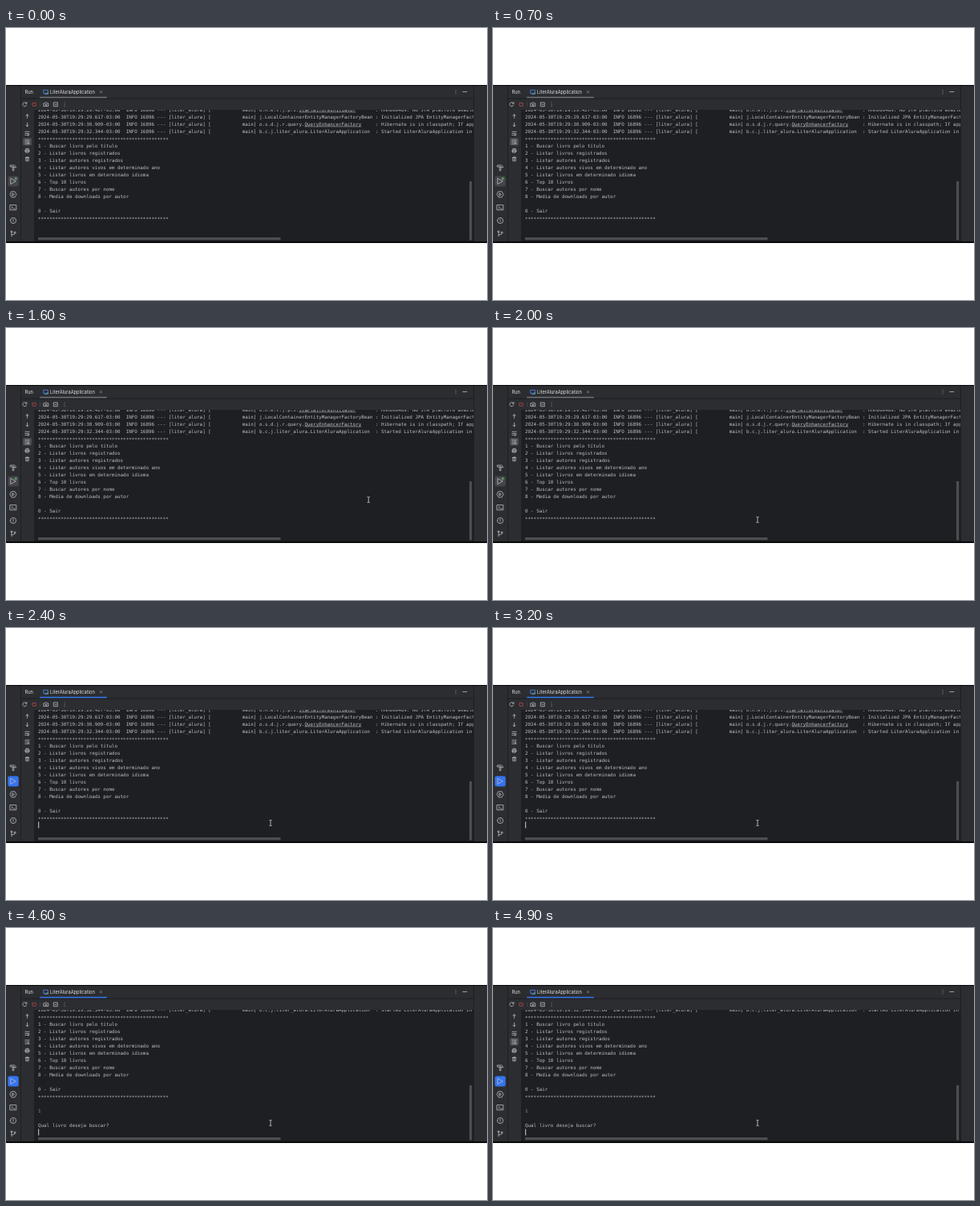
Write an HTML page that moves like this. It is 600 px wide and 339 px high and loops after 5000 ms.

```html
<!DOCTYPE html>
<html lang="pt">
<head>
<meta charset="utf-8">
<title>Console</title>
<style>
html, body { margin: 0; width: 100%; height: 100%; overflow: hidden; background: #fff; }
svg { display: block; width: 600px; height: 339px; }
text { white-space: pre; fill: #bcbec4; }
.ui { font: 5.7px Inter, sans-serif; fill: #dfe1e5; }
#log text { font: 5.88px "DejaVu Sans Mono", monospace; }
#log tspan { text-decoration: underline; }
#icons path { fill: none; stroke-width: .8; stroke-linecap: round; stroke-linejoin: round; }
</style>
</head>
<body>
<svg viewBox="0 0 600 339">
  <clipPath id="view"><rect x="36" y="102" width="547" height="163"/></clipPath>
  <rect y="71" width="600" height="197" fill="#2b2d30"/>
  <path d="M18.5 72V266M583.5 72V266M19 88H583" stroke="#1e1f22"/>
  <rect x="35" y="102" width="548" height="164" fill="#1e1f22"/>
  <path d="M0 71.5H600M0 266.5H600M0 267.5H600" stroke="#08090a"/>
  <text class="ui" x="23.5" y="81.7" font-weight="600">Run</text>
  <text class="ui" x="55" y="81.7">LiterAluraApplication</text>
  <rect id="tab" x="42" y="85.7" width="84" height="1.6" rx=".8"/>
  <rect id="run" x="2.3" y="184.5" width="13.4" height="13" rx="2.5"/>
  <rect id="follow" x="21" y="137" width="11" height="9.5" rx="2" fill="#4a4d52"/>
  <g id="icons"></g>
  <circle id="live" cx="12.2" cy="187.8" r="1.7" fill="#57965c"/>
  <g clip-path="url(#view)">
    <g id="log"></g>
    <rect id="caret" width="1" height="8" fill="#ced0d6"/>
  </g>
  <rect id="bar" x="578" width="3.2" fill="#4d4e51"/>
  <rect x="40" y="261" width="302.5" height="3.2" fill="#4d4e51"/>
  <path id="mouse" d="M-1.6-3.6Q0-3.6 0-2.6Q0-3.6 1.6-3.6M0-2.6V2.6M-1.6 3.6Q0 3.6 0 2.6Q0 3.6 1.6 3.6" fill="none" stroke="#d5d6d8" stroke-width=".8"/>
</svg>
<script>
const $ = id => document.getElementById(id);
const set = (id, attrs) => { for (const k in attrs) $(id).setAttribute(k, attrs[k]); };
const show = (id, on) => $(id).style.display = on ? '' : 'none';

// Toolbar icons: centre x, centre y, outline, colour
const dots = 'M0-2.2v.01M0 0v.01M0 2.2v.01';
const ring = 'M-3.6 0a3.6 3.6 0 1 0 7.2 0a3.6 3.6 0 1 0-7.2 0';
const icons = [
  [9, 174, 'M-3.4-3H1.5L3.5-1.2V-.2H1V-1H-3.4ZM-.8-1V3.8H.8V-1'],
  [8.7, 191, 'M-2.6-3.4L3.5 0L-2.6 3.4Z'],
  [9, 207.4, 'M-2-3.6H2L4 0L2 3.6H-2L-4 0ZM-.9-1.5L1.5 0L-.9 1.5Z'],
  [9, 223.7, 'M-3.8-3.1H3.8V3.1H-3.8ZM-2-1.2L-.6 0L-2 1.2M.4 1.4H2'],
  [9, 240, ring + 'M0-1.8V.4M0 1.8v.01'],
  [9, 256.3, 'M-2-1.4V3.4M-3-2.5a1 1 0 1 0 2 0a1 1 0 1 0-2 0M1.2-1.4a1 1 0 1 0 2 0a1 1 0 1 0-2 0M2.2-.4Q2.2 1.4-2 1.4'],
  [23.3, 95.3, 'M2.2-1.4A2.5 2.5 0 1 0 2.4.8M2.6-2.8V-1.1H.9'],
  [35.3, 95.3, 'M-1.9-1.9H1.9V1.9H-1.9Z', '#b54a4c'],
  [42.5, 95.3, 'M0-2.5V2.5', '#43454a'],
  [50, 95.3, 'M-2.8-1.5H-1.4L-.8-2.4H.8L1.4-1.5H2.8V2.3H-2.8ZM-.9.4a.9.9 0 1 0 1.8 0a.9.9 0 1 0-1.8 0'],
  [62, 95.3, 'M-2.3-2.4H2.3V2.4H-2.3ZM-1 0H1'],
  [73, 95.3, dots],
  [26.5, 110, 'M0 2.3V-2.3M-1.7-.6L0-2.3L1.7-.6'],
  [26.5, 120.5, 'M0-2.3V2.3M-1.7 .6L0 2.3L1.7 .6'],
  [26.5, 131.3, 'M-2.6-2H2.6M-2.6.2H1.6Q2.6.2 2.6 1.2T1.6 2.2H.2M1.1 1.3L.2 2.2L1.1 3.1M-2.6 2.2H-1.3'],
  [26.5, 142, 'M-2.6-2.2H2.6M-2.6 0H-.5M-2.6 2.3H2.6M1.4-.9V1.4M.4.5L1.4 1.4L2.4.5'],
  [26.5, 152.7, 'M-1.6-.7V-2.4H1.6V-.7M-1.6 1.4H-2.6V-.7H2.6V1.4H1.6M-1.6.6H1.6V2.4H-1.6Z'],
  [26.5, 163.3, 'M-2.3-1.7H2.3M-.9-1.7V-2.5H.9V-1.7M-1.7-1.7V2.5H1.7V-1.7M0-.3V1.3'],
  [49.7, 79.5, 'M-2.6-2.2H2.6V1.8H-2.6ZM-1.4 3H1.4', '#548af7'],
  [118.5, 79.7, 'M-1.3-1.3L1.3 1.3M1.3-1.3L-1.3 1.3', '#868a91'],
  [561, 79.5, dots],
  [572.3, 79.5, 'M-2.5 0H2.5']
];
$('icons').innerHTML = icons.map(([x, y, d, color = '#b9bbc1']) =>
  `<path transform="translate(${x} ${y})" d="${d}" stroke="${color}"/>`).join('') +
  '<circle cx="52" cy="81.5" r="1.2" fill="#57965c"/>';

// Console text, one entry per row; the linked class name is underlined
const stars = '*'.repeat(46);
const entry = (time, path, link, message) =>
  `2024-05-30T19:29:${time}-03:00  INFO 16896 --- [liter_alura] [           main] ` +
  `${path}<tspan>${link}</tspan>${' '.repeat(40 - path.length - link.length)} : ${message}`;
const rows = [
  entry('29.427', 'o.h.e.t.j.p.i.', 'JtaPlatformInitiator', 'HHH000489: No JTA platform available'),
  entry('29.617', 'j.LocalContainerEntityManagerFactoryBean', '', 'Initialized JPA EntityManagerFactory'),
  entry('30.909', 'o.s.d.j.r.query.', 'QueryEnhancerFactory', 'Hibernate is in classpath; If applicable'),
  entry('32.344', 'b.c.j.liter_alura.LiterAluraApplication', '', 'Started LiterAluraApplication in'),
  stars,
  '1 - Buscar livro pelo título',
  '2 - Listar livros registrados',
  '3 - Listar autores registrados',
  '4 - Listar autores vivos em determinado ano',
  '5 - Listar livros em determinado idioma',
  '6 - Top 10 livros',
  '7 - Buscar autores por nome',
  '8 - Media de downloads por autor',
  '',
  '0 - Sair',
  stars,
  '',
  '1',
  '',
  'Qual livro deseja buscar?'
];
$('log').innerHTML = rows.map((row, i) =>
  `<text id="row${i}" x="40" y="${103.6 + 9 * i + (row === stars ? 1 : 0)}">${row}</text>`).join('');
$('row17').style.fill = '#7f9a80';

function draw(now) {
  const t = Math.floor(now % 5000 / 100) * 100;
  const focused = t >= 2200, typed = t >= 4000, answered = t >= 4600;

  set('tab', { fill: focused ? '#3574f0' : '#6f737a' });
  set('run', { fill: focused ? '#3574f0' : '#43454a' });
  show('live', !focused);
  show('follow', !focused || t >= 4900);

  set('log', { transform: `translate(0 ${answered ? -27 : 0})` });
  show('row17', typed);
  show('row19', answered);
  const top = answered ? 196 : 191;
  set('bar', { y: top, height: 264.5 - top });

  show('caret', focused && (t < 2700 || t >= 3200 && t < 3800 || typed));
  set('caret', { x: typed && !answered ? 43.4 : 40.2, y: typed ? 250.5 : 241.5 });

  // The pointer slides in, slows down, then settles a little lower
  const rest = 1 - Math.min(1, (t - 1500) / 500);
  const drop = Math.max(0, Math.min(1, (t - 2000) / 400));
  show('mouse', t >= 1500);
  set('mouse', { transform: `translate(${330 + 191 * rest ** 2} ${239 - 39 * rest ** 2 + 4 * drop})` });

  requestAnimationFrame(draw);
}
requestAnimationFrame(draw);
</script>
</body>
</html>
```
